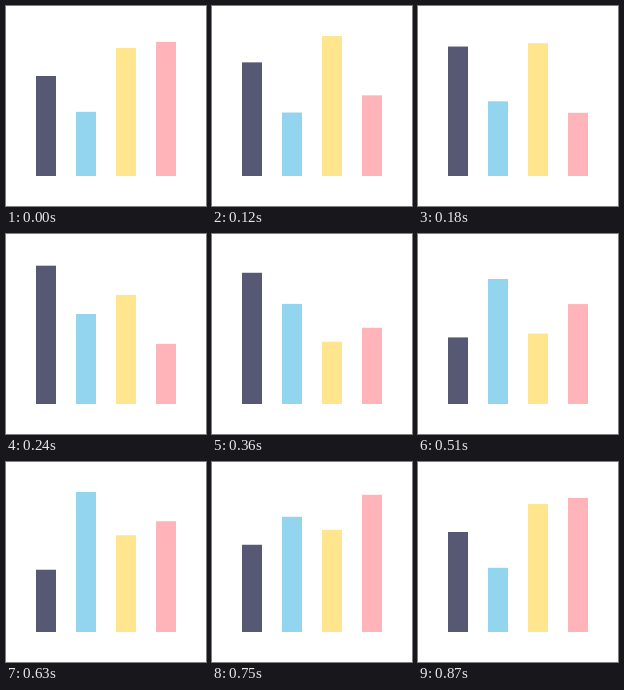
These frames come from a looping animation (200x200 px, 900 ms). An HTML page:

```html
<!DOCTYPE html>
<html lang="en">
<head>
<meta charset="utf-8">
<title>Equalizer</title>
<style>
  html, body { margin: 0; width: 100%; height: 100%; overflow: hidden; background: #fff; }
  svg { display: block; width: 100%; height: 100%; }
</style>
</head>
<body>
<svg viewBox="0 0 200 200">
  <rect x="30" width="20" fill="#565874"/>
  <rect x="70" width="20" fill="#93d5ee"/>
  <rect x="110" width="20" fill="#fee58e"/>
  <rect x="150" width="20" fill="#feb4b8"/>
</svg>
<script>
const STEP = 30, COUNT = 30, BASE = 170;
const OFFSETS = [0, 0.6, 0.2, 0.4];
const TIMES = [0, 0.33, 0.66, 1];
const HEIGHTS = [100, 140, 60, 100];
const bars = document.querySelectorAll('rect');

// cubic-bezier(0.5, 0, 0.5, 1), solved by bisection
function ease(x) {
  let lo = 0, hi = 1;
  for (let k = 0; k < 24; k++) {
    const s = (lo + hi) / 2;
    if (1.5 * s * (1 - s) + s * s * s < x) lo = s; else hi = s;
  }
  return lo * lo * (3 - 2 * lo);
}

function heightAt(phase) {
  const p = phase % 1;
  const k = p < TIMES[1] ? 0 : p < TIMES[2] ? 1 : 2;
  const u = (p - TIMES[k]) / (TIMES[k + 1] - TIMES[k]);
  return HEIGHTS[k] + (HEIGHTS[k + 1] - HEIGHTS[k]) * ease(u);
}

function draw(ms) {
  // The last step repeats the first pose, so one cycle spans COUNT - 1 steps
  const phase = (Math.floor(ms / STEP) % COUNT) / (COUNT - 1);
  bars.forEach((bar, i) => {
    const h = heightAt(phase + OFFSETS[i]);
    bar.setAttribute('y', BASE - h);
    bar.setAttribute('height', h);
  });
}

let start = null;
function tick(now) {
  if (start === null) start = now;
  draw(Math.max(0, now - start));
  requestAnimationFrame(tick);
}
draw(0);
requestAnimationFrame(tick);
</script>
</body>
</html>
```
